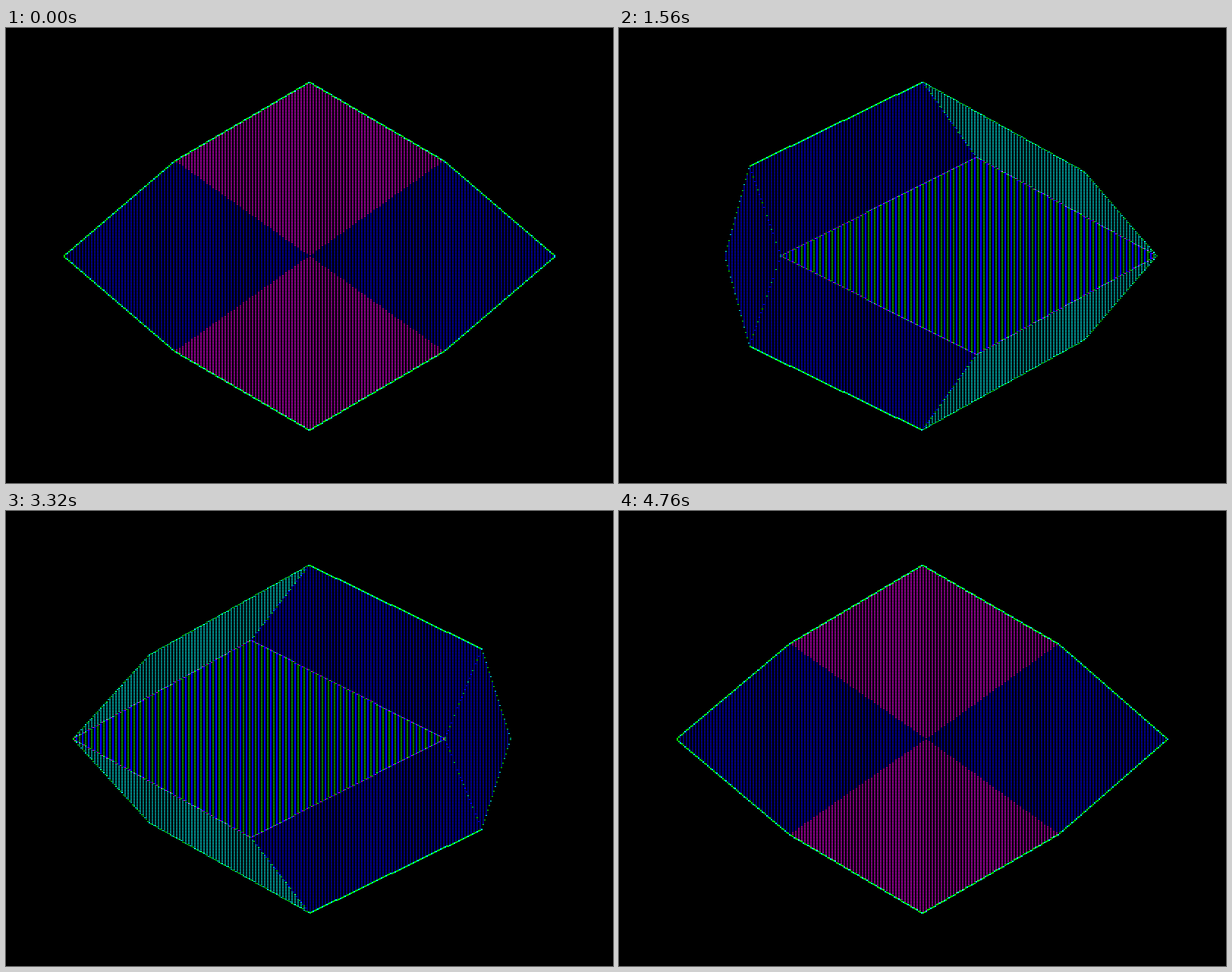
An HTML page with a canvas for the animation above (4800 ms loop, 800 by 600 pixels).

```html
<!DOCTYPE html>
<html lang="en">
<head>
<meta charset="utf-8">
<title>Rotating rhombic dodecahedron</title>
<style>
html, body { margin: 0; width: 100%; height: 100%; overflow: hidden; background: #000; }
canvas { display: block; width: 800px; height: 600px; }
</style>
</head>
<body>
<canvas id="stage" width="800" height="600"></canvas>
<script>
const ctx = document.getElementById('stage').getContext('2d');
const LOOP = 4800, STEP = 40, TURN = 90;
const CX = 400, CY = 300.5, SX = 162, SY = 114.75, EYE = 11.5;
const RAD = Math.PI / 180;

const INK = { b: '#0000ff', g: '#00ff00', c: '#00ffff', m: '#ff00ff' };

// Dither tiles: four double-wide columns by two rows, the second mostly blank.
function tile(...rows) {
  const cell = document.createElement('canvas');
  cell.width = 8;
  cell.height = 2;
  const c = cell.getContext('2d');
  rows.forEach((row, y) => [...row].forEach((k, x) => {
    if (!INK[k]) return;
    c.fillStyle = INK[k];
    c.fillRect(x * 2, y, 2, 1);
  }));
  return ctx.createPattern(cell, 'repeat');
}

const BLUE = tile('b.b.');
const CYAN = tile('c.c.');
const MAGENTA = tile('m.m.');
const SPARSE = tile('m...');
const GREEN = tile('g...', 'g...');

// Fill by the angle between the face and the viewer: [angle, tile].
const BELT = [
  [7, BLUE], [15.75, tile('g.b.', '..b.')], [27, GREEN],
  [45, BLUE], [63, SPARSE], [74, BLUE], [84, GREEN]
];
const CAP = [
  [0, MAGENTA], [18, SPARSE], [29.25, BLUE], [37.5, tile('c.b.', 'c.b.')],
  [39, CYAN], [51, '#000'], [52.5, SPARSE], [60.75, CYAN], [72, tile('b...')]
];

const turn = a => Math.abs((a + 900) % 360 - 180);
const beltSeen = a => turn(a) < 82.9;
const capSeen = a => turn(a) < 80;

function shade(list, a) {
  const t = turn(a);
  return list.reduce((p, q) => Math.abs(q[0] - t) < Math.abs(p[0] - t) ? q : p)[1];
}

function point(radius, height, a) {
  const z = radius * Math.cos(a * RAD);
  const p = EYE / (EYE - z);
  return [CX + radius * Math.sin(a * RAD) * SX * p, CY - height * SY * p];
}
const tip = a => point(2, 0, a);
const corner = (a, side) => point(Math.SQRT2, side, a);
const pole = side => point(0, 2 * side, 0);

function columns(points, paint) {
  const xs = points.map(p => p[0]);
  const end = Math.max(...xs);
  for (let x = Math.floor(Math.min(...xs) / 2 + .5) * 2; x < end; x += 2) paint(x);
}

function fillFace(points, style) {
  ctx.fillStyle = style;
  columns(points, x => {
    const ys = [];
    points.forEach((p, i) => {
      const q = points[(i + 1) % points.length];
      const m = x + 1;
      if ((p[0] <= m) !== (q[0] <= m)) {
        ys.push(p[1] + (q[1] - p[1]) * (m - p[0]) / (q[0] - p[0]));
      }
    });
    if (ys.length < 2) return;
    const top = Math.round(Math.min(...ys));
    ctx.fillRect(x, top, 2, Math.round(Math.max(...ys)) - top);
  });
}

// One dot per column, so steep edges come out dotted.
function drawEdge(p, q, inks, size) {
  columns([p, q], x => {
    const ink = INK[inks[(x >> 1) % inks.length]];
    if (!ink) return;
    const k = Math.min(1, Math.max(0, (x + 1 - p[0]) / (q[0] - p[0])));
    ctx.fillStyle = ink;
    ctx.fillRect(x, Math.floor(p[1] + (q[1] - p[1]) * k), 2, size);
  });
}

function outline(p, q, facing) {
  drawEdge(p, q, 'gcg', turn(facing) < 50 ? 2 : 1);
}

function drawBeltEdge(p, q, belt, cap) {
  const a = beltSeen(belt), b = capSeen(cap);
  if (a && b) {
    const t = turn(belt);
    if (t < 22) drawEdge(p, q, 'mgb', 1);
    else if (t + turn(cap) > 46.6) drawEdge(p, q, 'bgb', 1);
  } else if (a || b) {
    outline(p, q, b ? cap : belt);
  }
}

function drawCapEdge(p, q, left, right) {
  const a = capSeen(left), b = capSeen(right);
  if (a && b) drawEdge(p, q, 'bgb', 1);
  else if (a || b) outline(p, q, a ? left : right);
}

function render(angle) {
  ctx.fillStyle = '#000';
  ctx.fillRect(0, 0, 800, 600);
  const azimuths = [0, 90, 180, 270].map(a => a - angle);

  for (const a of azimuths) {
    const m = a + 45;
    if (beltSeen(m)) {
      fillFace([tip(a), corner(m, 1), tip(a + 90), corner(m, -1)], shade(BELT, m));
    }
    if (capSeen(a)) {
      for (const s of [1, -1]) {
        fillFace([pole(s), corner(a - 45, s), tip(a), corner(m, s)], shade(CAP, a));
      }
    }
  }

  for (const a of azimuths) {
    const m = a + 45;
    for (const s of [1, -1]) {
      drawBeltEdge(tip(a), corner(m, s), m, a);
      drawBeltEdge(tip(a + 90), corner(m, s), m, a + 90);
      drawCapEdge(pole(s), corner(m, s), a, a + 90);
    }
  }
}

const start = performance.now();
let shown = -1;
function tick() {
  const step = Math.floor((performance.now() - start) % LOOP / STEP);
  if (step !== shown) {
    shown = step;
    render(step * STEP / LOOP * TURN);
  }
  requestAnimationFrame(tick);
}
tick();
</script>
</body>
</html>
```
